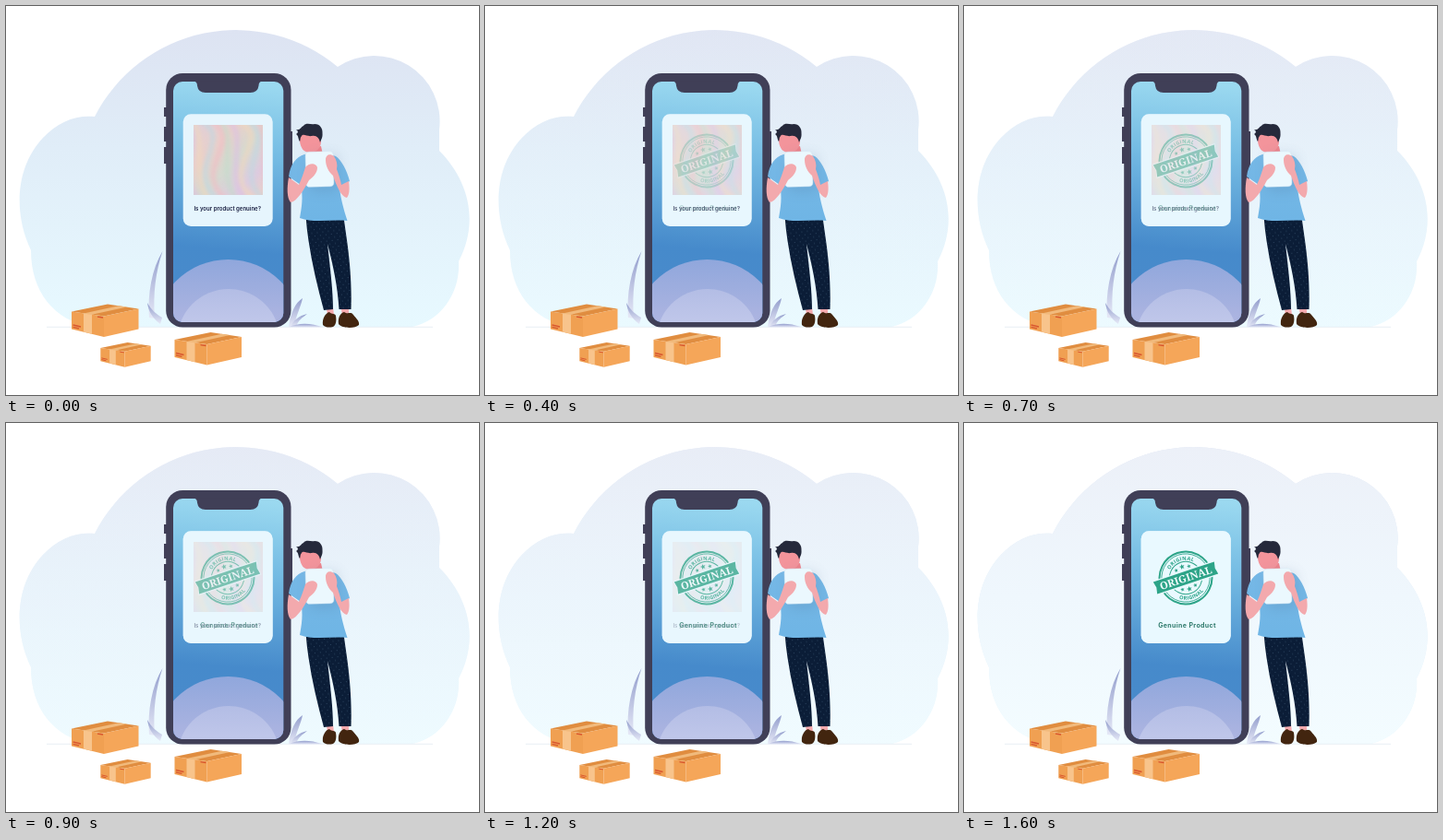
Recreate the animation shown at these times as an HTML page. Size 512 by 422 pixels, loop 1.7 s.

```html
<!DOCTYPE html>
<html lang="en">
<head>
<meta charset="utf-8">
<title>Genuine product check</title>
<style>
  html, body { margin: 0; width: 100%; height: 100%; overflow: hidden; background: #fff; }
  svg { display: block; width: 100vw; height: 100vh; }
  .label { font: 600 6.05px Inter, sans-serif; text-anchor: middle; }
  .slab { font: 900 11.2px "Noto Serif", serif; text-anchor: middle; }
  .rim { font: 700 5.6px "Open Sans", sans-serif; letter-spacing: .3px; text-anchor: middle; }
</style>
</head>
<body>
<svg viewBox="0 0 512 422" xmlns="http://www.w3.org/2000/svg">
  <defs>
    <linearGradient id="cloudA" x2="0" y2="1">
      <stop offset="0" stop-color="#dde3f2"/><stop offset=".4" stop-color="#e0edf8"/><stop offset="1" stop-color="#e7f9ff"/>
    </linearGradient>
    <linearGradient id="cloudB" x2="0" y2="1">
      <stop offset="0" stop-color="#ecf0f8"/><stop offset=".5" stop-color="#eff7fd"/><stop offset="1" stop-color="#f3fcff"/>
    </linearGradient>
    <linearGradient id="screen" x1=".52" x2=".48" y2="1">
      <stop offset="0" stop-color="#9bd9f0"/><stop offset=".3" stop-color="#74bbe3"/><stop offset=".7" stop-color="#468acb"/><stop offset="1" stop-color="#4a8bcb"/>
    </linearGradient>
    <linearGradient id="hillBack" x2="0" y2="1">
      <stop offset="0" stop-color="#90a7dc"/><stop offset=".43" stop-color="#aeb5e1"/>
    </linearGradient>
    <linearGradient id="hillFront" x2="0" y2="1">
      <stop offset="0" stop-color="#b3bde5"/><stop offset=".33" stop-color="#c0c7ea"/>
    </linearGradient>
    <linearGradient id="leaf" x2="0" y2="1">
      <stop offset="0" stop-color="#929dcc"/><stop offset="1" stop-color="#e6e9f7"/>
    </linearGradient>
    <linearGradient id="shirt" x2="0" y2="1">
      <stop offset="0" stop-color="#76b8e6"/><stop offset="1" stop-color="#6fb5e5"/>
    </linearGradient>
    <linearGradient id="holo" x2="1" y2="1">
      <stop offset="0" stop-color="#dfcfd9"/><stop offset=".3" stop-color="#e9cfca"/><stop offset=".55" stop-color="#d5d9d0"/><stop offset=".8" stop-color="#ddcbdf"/><stop offset="1" stop-color="#e8d0ca"/>
    </linearGradient>
    <pattern id="dots" width="6" height="7" patternUnits="userSpaceOnUse" patternTransform="rotate(-7)">
      <rect width="6" height="7" fill="#0b1d37"/>
      <circle cx="1.5" cy="1.5" r=".5" fill="#36516c"/><circle cx="4.5" cy="5" r=".5" fill="#36516c"/>
    </pattern>
    <filter id="soft" x="-30%" y="-30%" width="160%" height="160%"><feGaussianBlur stdDeviation="2"/></filter>
    <filter id="glow" x="-60%" y="-60%" width="220%" height="220%"><feGaussianBlur stdDeviation="7"/></filter>
    <clipPath id="screenClip"><rect x="181" y="82" width="119.3" height="261" rx="10"/></clipPath>
    <clipPath id="holoClip"><rect x="203" y="129" width="75" height="76"/></clipPath>
    <path id="cloud" d="M92 348C52 341 27 310 27 265C8 225 10 175 40 143C56 126 75 118 96 120A171.6 171.6 0 0 1 359 66A71 71 0 0 1 469 134V157C500 188 513 233 490 277C492 310 472 341 440 348Z"/>
    <path id="arcTop" d="M-19.3 0A19.3 19.3 0 0 1 19.3 0"/>
    <path id="arcLow" d="M-23.8 0A23.8 23.8 0 0 0 23.8 0"/>
    <g id="box">
      <path d="M0 8L39 0L72.5 5L35 13Z" fill="#e08d40"/>
      <path d="M0 8L35 13V35.5L0 27Z" fill="#f0a052"/>
      <path d="M35 13L72.5 5V27L35 35.5Z" fill="#f5a659"/>
      <path d="M13 9.9L51 1.8L60 3.1L22 11.2Z" fill="#f1ba7c"/>
      <path d="M13 9.9L22 11.2V32.3L13 30.1Z" fill="#f8c48c"/>
      <path d="M1.5 22.5L10 24.5M1.5 24.8L8 26.4M28 13.6L34 14.5" stroke="#d8552f" stroke-width="1.3"/>
    </g>
  </defs>

  <use href="#cloud" fill="url(#cloudA)"/>
  <use id="paleCloud" href="#cloud" fill="url(#cloudB)"/>
  <path d="M44 348.3H462" stroke="#e4ebf1" stroke-width=".8"/>

  <g fill="url(#leaf)">
    <path d="M169.5 266C158 285 153 312 155 338L161 339C159 312 162 288 169.5 266Z"/>
    <path d="M153 322C154 331 159 339 167 345L169 338C162 334 157 329 153 322Z"/>
    <path d="M321 317C313 322 308 333 306 348H312C314 335 319 327 321 317Z"/>
    <path d="M326 334C317 336 311 341 308 348H314C316 341 321 338 326 334Z"/>
    <path d="M306 348.5C317 343 331 344 343 348.5Z"/>
  </g>

  <g fill="#403f57">
    <path d="M171 110h4v10h-4zM171 131h4v16h-4zM171 153h4v18h-4zM306 136h4v42h-4z"/>
    <rect x="173.2" y="73" width="135.3" height="275.6" rx="18"/>
  </g>
  <g clip-path="url(#screenClip)">
    <rect x="181" y="82" width="120" height="261" fill="url(#screen)"/>
    <circle cx="240.5" cy="355" r="80" fill="url(#hillBack)"/>
    <circle cx="241" cy="362.5" r="55.5" fill="url(#hillFront)"/>
  </g>
  <path d="M203 81.5Q207 82 207 86.5Q208 94 216 94H264.500Q272.500 94 273.500 86.500Q273.500 82 277.500 81.500Z" fill="#403f57"/>

  <rect x="191.700" y="117.300" width="97" height="121.700" rx="8.500" fill="#e6f5fd"/>
  <rect id="paleCard" x="191.700" y="117.300" width="97" height="121.700" rx="8.500" fill="#e9f9ff"/>

  <g id="before">
    <g clip-path="url(#holoClip)">
      <rect x="203" y="129" width="75" height="76" fill="url(#holo)"/>
      <g id="waves" fill="none" stroke-width="5" opacity=".65" filter="url(#soft)"/>
    </g>
    <text class="label" x="239.7" y="222" fill="#1b2143">Is your product genuine?</text>
  </g>

  <g id="after">
    <g transform="translate(240 168) rotate(-18.5)" fill="#2da488">
      <g fill="none" stroke="#2da488">
        <circle r="28.4" stroke-width="2"/>
        <circle r="26.1" stroke-width=".8"/>
        <circle r="17.6" stroke-width="1"/>
      </g>
      <text class="rim"><textPath href="#arcTop" startOffset="50%">ORIGINAL</textPath></text>
      <text class="rim"><textPath href="#arcLow" startOffset="50%">ORIGINAL</textPath></text>
      <path id="stars"/>
      <path d="M-36 -8.2H36L34 0L36 8.2H-36L-34 0Z" fill="#e9f9ff"/>
      <path d="M-34.8 -6.9H34.8L33.4 0L34.8 6.9H-34.8L-33.4 0Z"/>
      <text class="slab" y="4.1" fill="#f4fdff">ORIGINAL</text>
    </g>
    <text class="label" x="241.6" y="222" fill="#2f7a6b" style="font-weight:700;font-size:7px;letter-spacing:.38px">Genuine Product</text>
  </g>

  <g id="man">
    <path d="M347 328L354 327L355 335L348 337ZM362 325L371 325L371 333L364 335Z" fill="#f3a9ad"/>
    <path d="M343 346C342 339 346 333 350 332C353 335 356 333 357 336C358 342 357 346 354 348C350 349 346 349 343 346ZM360 345C359 338 362 333 366 332C370 335 373 331 376 335C379 339 383 342 382 346C378 350 364 350 360 345Z" fill="#42250f"/>
    <path d="M324.500 228L365 225C368 250 375 284 373.500 329L360.500 329C359 304 354 281 348 258C351 285 354 309 354 329L344 330C335 297 327 262 324.500 228Z" fill="url(#dots)"/>
    <path d="M326 154L341 152L344 166L327 168Z" fill="#ee858d"/>
    <path d="M323 161C314 164 308 171 306 185L319 194C322 207 320 219 318 230C334 236 352 231 369.500 233C365 219 362 207 361 197L372 190C369 178 363 167 357 163L344 159Z" fill="url(#shirt)"/>
    <path d="M318 147C317 139 322 134 331 134C338 134 341 140 341 147C341 154 336 159 329 159C322 159 319 154 318 147Z" fill="#f3949b"/>
    <path d="M318 147C316 144 317 141 314 139C316 138 317 136 314 134C319 135 319 131 322 130C325 126 330 129 334 128C340 128 343 133 342.500 138C343 143 341 145 340 148C339 143 336 140 331 141C326 142 322 138 320 141C318 143 319 145 318 147Z" fill="#25293b"/>
    <rect x="328" y="161" width="32" height="40" rx="5" fill="#405f83" opacity=".18" filter="url(#glow)"/>
    <rect x="324.500" y="158" width="30" height="38" rx="4" fill="#ebf8fe" stroke="#d7e9f5" stroke-width=".5" transform="rotate(-1.500 340 177)"/>
    <path d="M306 186C304 197 304 208 308 213C315 212 322 200 328 189C333 185 337 181 337 175C335 169 327 171 324 175C322 181 320 188 317 194Z" fill="#f3a9ad"/>
    <path d="M371 190C372 198 372 204 369 208C363 207 358 196 354 184C349 180 346 173 346 167C346 161 351 160 355 163C358 167 359 172 358 177C360 183 362 188 363 194Z" fill="#f3a9ad"/>
  </g>

  <use href="#box" x="71" y="323.5"/>
  <use href="#box" transform="translate(102.300 365) scale(.75)"/>
  <use href="#box" x="182.500" y="354"/>
</svg>
<script>
  const STEP = 100, STEPS = 17;
  const get = id => document.getElementById(id);

  function starPath(cx, cy, r) {
    const pts = Array.from({ length: 10 }, (_, i) => {
      const a = i * Math.PI / 5 - Math.PI / 2, d = i % 2 ? r * 0.42 : r;
      return (cx + d * Math.cos(a)).toFixed(2) + " " + (cy + d * Math.sin(a)).toFixed(2);
    });
    return "M" + pts.join("L") + "Z";
  }

  get("stars").setAttribute("d", [-1, 1].map(side =>
    [-1, 0, 1].map(i => starPath(i * 7.3, side * (i ? 10.9 : 12.7), i ? 2.4 : 3.1)).join("")
  ).join(""));

  // Iridescent bands behind the question
  const hues = ["#f2bcc4", "#c2dccb", "#dcc0e4", "#f0d8bd", "#bfd8e2"];
  get("waves").innerHTML = Array.from({ length: 13 }, (_, i) => {
    const x = 172 + i * 10, bend = 13 * Math.sin(i * 1.7);
    return `<path stroke="${hues[i % hues.length]}" d="M${x} 125C${x + 28 + bend} 145 ${x - 14 - bend} 178 ${x + 17} 210"/>`;
  }).join("");

  function draw(ms) {
    const p = Math.floor(ms / STEP) % STEPS / (STEPS - 1);
    get("before").setAttribute("opacity", 1 - p);
    for (const id of ["after", "paleCloud", "paleCard"]) get(id).setAttribute("opacity", p);
  }

  const start = performance.now();
  function tick() {
    draw(performance.now() - start);
    requestAnimationFrame(tick);
  }
  tick();
</script>
</body>
</html>
```
